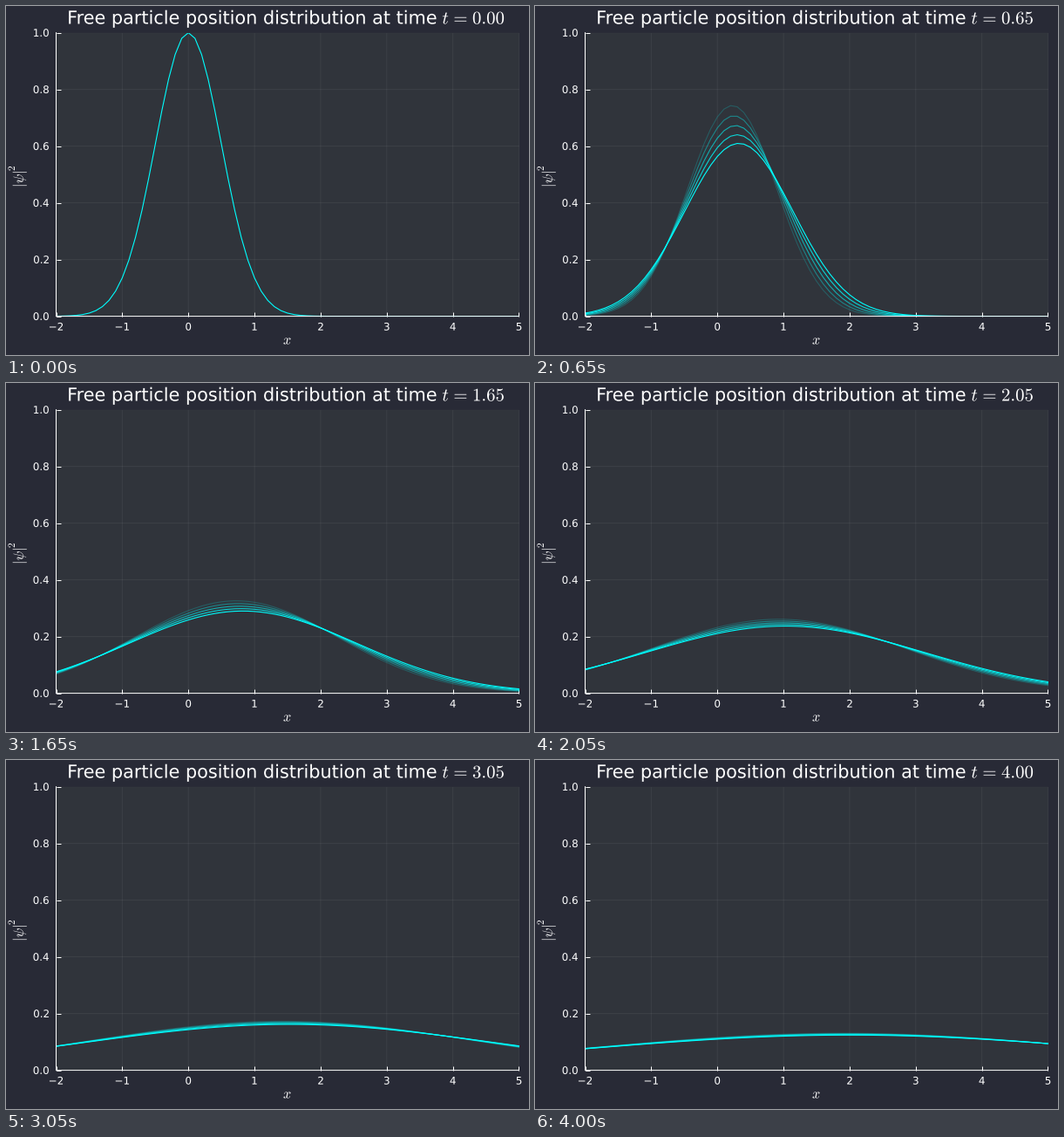
Recreate the animation shown at these times as a matplotlib script. Size 600 by 400 pixels, loop 4050 ms.

```python
import numpy as np
import matplotlib.pyplot as plt
from matplotlib.animation import FuncAnimation
from matplotlib.patches import PathPatch
from matplotlib.textpath import TextPath
from matplotlib.transforms import Affine2D

W, H, DPI = 600, 400, 100
LEFT, RIGHT, TOP, BOTTOM = 57.5, 588.5, 30.6, 355.6
FRAMES, STEP_MS, DT = 81, 50, 0.05
TRAIL = 5
TITLE_PX, GUIDE_PX, TICK_PX = 20.8, 16.3, 11.9

plt.rcParams["mathtext.fontset"] = "cm"
plt.rcParams["path.snap"] = False


def pt(px):
    return px * 72 / DPI


def density(x, t):
    """Spreading Gaussian packet drifting at speed 1/2."""
    spread = 1 + 4 * t * t
    return np.exp(-2 * (x - t / 2) ** 2 / spread) / np.sqrt(spread)


def text_path(s, x, y, size, align=0.5, angle=0):
    """Outline of s; its ink is aligned on x, its baseline lies at y (from the top)."""
    path = TextPath((0, 0), s, size=size, prop={"family": "DejaVu Sans"})
    box = path.get_extents()
    shift = box.x0 + align * box.width
    place = Affine2D().translate(-shift, 0).rotate_deg(angle).translate(x, H - y)
    return path.transformed(place)


def clock_path(t):
    # Slightly wider gaps around the sign, as TeX sets them
    s = rf"$t\hspace{{0.1}}=\hspace{{0.1}}{t:.2f}$"
    return text_path(s, 500.8, 20.5, TITLE_PX, align=0)


fig = plt.figure(figsize=(W / DPI, H / DPI), dpi=DPI, facecolor="#282a36")
pixels = Affine2D().scale(1 / W, 1 / H) + fig.transFigure


def add_ink(path):
    return fig.add_artist(PathPatch(path, fc="white", lw=0, transform=pixels))


def label(*args, **kwargs):
    return add_ink(text_path(*args, **kwargs))


ax = fig.add_axes([LEFT / W, 1 - BOTTOM / H,
                   (RIGHT - LEFT) / W, (BOTTOM - TOP) / H],
                  facecolor="#30343b")
ax.set(xlim=(-2, 5), ylim=(0, 1),
       xticks=np.arange(-2, 6), yticks=np.linspace(0, 1, 6))
ax.spines[["top", "right"]].set_visible(False)
ax.spines[["left", "bottom"]].set(color="white", linewidth=pt(1))
ax.tick_params(direction="in", length=pt(5), width=pt(1), color="white",
               labelbottom=False, labelleft=False)
ax.grid(color="white", alpha=0.06, lw=pt(1))
ax.set_axisbelow(True)

for k in range(-2, 6):
    px = LEFT + (k + 2) / 7 * (RIGHT - LEFT)
    label(str(k).replace("-", "\u2212"), px, 371.7, TICK_PX)
for v in np.linspace(0, 1, 6):
    py = BOTTOM - v * (BOTTOM - TOP)
    label(f"{v:.1f}", 48.9, py + 0.365 * TICK_PX, TICK_PX, align=1)

label("$x$", 322.5, 387.7, GUIDE_PX)
label(r"$|\psi|$", 19.8, 198.2, GUIDE_PX, angle=90)
label("$2$", 10, 186.2, 0.7 * GUIDE_PX, angle=90)

label("Free particle position distribution at time", 72.2, 20.5, TITLE_PX, align=0)
clock = add_ink(clock_path(0))

x = np.linspace(-2, 5, 71)
# Oldest and faintest first
trail = [ax.plot([], [], color="cyan", lw=pt(1.1), alpha=(k + 1) / TRAIL)[0]
         for k in range(TRAIL)]


def update(i):
    for k, line in enumerate(trail):
        step = i - (TRAIL - 1 - k)
        if step < 0:
            line.set_data([], [])
        else:
            line.set_data(x, density(x, step * DT))
    clock.set_path(clock_path(i * DT))
    return [*trail, clock]


anim = FuncAnimation(fig, update, frames=FRAMES, interval=STEP_MS,
                     init_func=lambda: update(0), repeat=True,
                     repeat_delay=0, blit=False)
plt.show()
```
